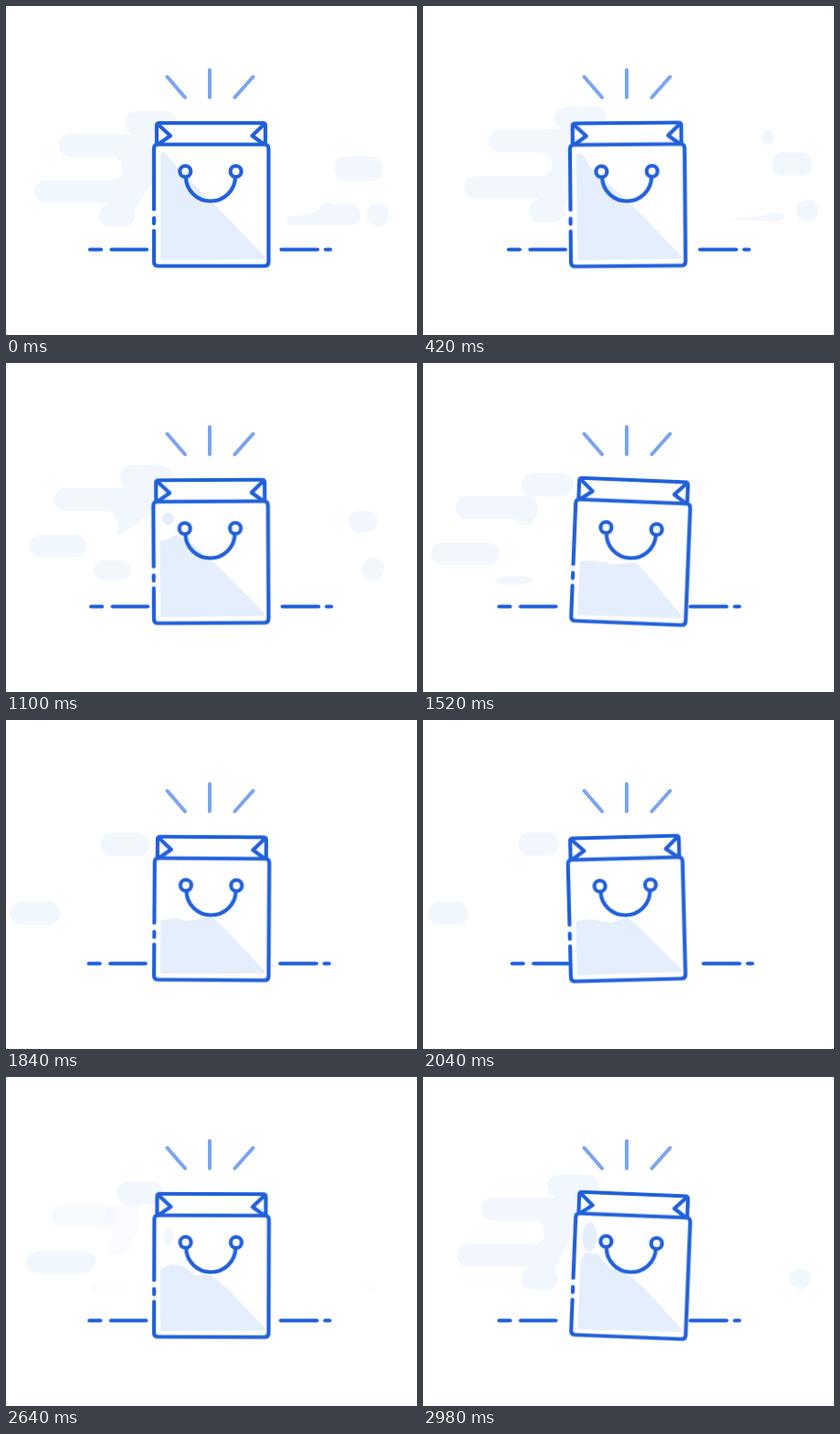
Animation of 450x360 px, one loop 3000 ms. Source, as an HTML page:

```html
<!DOCTYPE html>
<html lang="en">
<head>
<meta charset="utf-8">
<title>Happy shopping bag</title>
<style>
  html, body { margin: 0; height: 100%; overflow: hidden; background: #fff; }
  svg { display: block; width: 100%; height: 100%; }

  .line { fill: none; stroke: #2160da; stroke-width: 4.2; stroke-linecap: round; stroke-linejoin: round; }
  .paper { fill: #fff; }
  .spark { fill: none; stroke: #7aa4f0; stroke-width: 4; stroke-linecap: round; }
  .cloud { fill: #f2f7fe; }
  .shade { fill: #e5eefd; stroke: #e5eefd; stroke-width: 4; stroke-linejoin: round; }

  .cloud, .cloud *, .ground, .bag, .bag * { animation: 3s linear infinite; }

  /* Rocking bag, with the ground sliding the other way */
  .bag { transform-origin: 225px 284px; animation-name: rock; }
  .ground { animation-name: slide; }
  .bag, .ground { animation-timing-function: cubic-bezier(.37, 0, .63, 1); }
  @keyframes rock {
    0% { transform: rotate(0deg); }
    6.33% { transform: rotate(.5deg); }
    25.33%, 75% { transform: rotate(-2.3deg); }
    50.17%, 99.83%, 100% { transform: rotate(2.3deg); }
  }
  @keyframes slide {
    0% { transform: translateX(0); }
    6.33% { transform: translateX(-2px); }
    25.33%, 75% { transform: translateX(8.7px); }
    50.17%, 99.83%, 100% { transform: translateX(-8.7px); }
  }

  /* Cloud drift, one axis per group */
  .cloud { animation-name: drift-x; }
  .cloud .rise { animation-name: drift-y; }
  @keyframes drift-x {
    0% { transform: translateX(0); animation-timing-function: cubic-bezier(.3, .5, .6, 1); }
    14% { transform: translateX(14px); animation-timing-function: cubic-bezier(.37, 0, .63, 1); }
    61.33% { transform: translateX(-27px); animation-timing-function: cubic-bezier(.45, 0, .8, .75); }
    99.33%, 100% { transform: translateX(6px); }
  }
  @keyframes drift-y {
    0% { transform: translateY(0); animation-timing-function: cubic-bezier(.4, .5, .65, 1); }
    25.33% { transform: translateY(-6.5px); animation-timing-function: cubic-bezier(.37, 0, .63, 1); }
    61.33% { transform: translateY(8.5px); animation-timing-function: cubic-bezier(.45, 0, .8, .75); }
    99.33%, 100% { transform: translateY(-8px); }
  }

  /* Cloud parts thinning out and returning */
  .top { animation-name: top; }
  @keyframes top {
    0%, 50.67% { width: 57px; }
    61.33% { width: 55px; }
    76.67% { width: 33px; }
    92%, 100% { width: 57px; }
  }
  .mid { animation-name: mid; }
  @keyframes mid {
    0%, 36.67% { width: 100px; opacity: 1; }
    50.67% { width: 90px; opacity: 1; }
    60%, 82% { width: 60px; opacity: 0; }
    92%, 100% { width: 80px; opacity: 1; }
  }
  .low { animation-name: low; }
  @keyframes low {
    0%, 18% { width: 100px; }
    36.67% { width: 62px; }
    50.67% { width: 75px; }
    61.33% { width: 56px; }
    76.67% { width: 30px; }
    94%, 100% { width: 100px; }
  }
  .foot { animation-name: foot; }
  @keyframes foot {
    0%, 20% { y: 217px; height: 24px; opacity: 1; }
    36.67% { y: 219px; height: 21px; opacity: 1; }
    50.67% { y: 228px; height: 9px; opacity: 1; }
    57%, 84% { y: 230px; height: 6px; opacity: 0; }
    94%, 100% { y: 217px; height: 24px; opacity: 1; }
  }
  .core { animation-name: core; }
  @keyframes core {
    0%, 18% { opacity: 1; d: path("M120 140L162 140L162 190L140 224L112 222L112 191L115 191C131 191 131 165 115 165Z"); }
    36.67% { opacity: 1; d: path("M120 140L167 140L165 166L147 180L128 192L127 190L127 189C129 180 127 165 115 165Z"); }
    50.67% { opacity: 1; d: path("M120 142L146 142L148 160L140 171L130 172L127 170L127 169C127 167 122 165 115 165Z"); }
    60%, 82% { opacity: 0; d: path("M120 142L146 142L148 160L140 171L130 172L127 170L127 169C127 167 122 165 115 165Z"); }
    95%, 100% { opacity: 1; d: path("M120 140L162 140L160 172L138 222L112 222L112 191L115 191C131 191 131 165 115 165Z"); }
  }
  .pill { animation-name: pill; }
  @keyframes pill {
    0% { x: 360px; width: 52px; height: 26px; opacity: 1; }
    14% { x: 368px; width: 44px; height: 25px; opacity: 1; }
    36.67% { x: 380px; width: 32px; height: 23px; opacity: 1; }
    46%, 100% { x: 388px; width: 22px; height: 16px; opacity: 0; }
  }
  .tail { animation-name: tail; }
  @keyframes tail {
    0% { opacity: 1; d: path("M309 240Q304 236 309 230Q334 229 343 222Q346 214 353 215Q360 218 376 217Q388 217 388 228Q388 240 376 240Z"); }
    14% { opacity: 1; d: path("M318 239Q316 239 322 238Q345 236 360 234Q366 230 372 231Q376 230 379 232Q382 234 381 237Q380 240 372 240Z"); }
    24%, 100% { opacity: 0; d: path("M330 239Q332 239 334 238Q345 237 360 236Q366 234 372 234Q376 234 379 235Q380 236 380 237Q380 239 372 239Z"); }
  }
  .puff { animation-name: puff; }
  @keyframes puff {
    0%, 4% { opacity: 0; }
    10%, 18% { opacity: 1; }
    25%, 100% { opacity: 0; }
  }
  .dot { animation-name: dot; }
  @keyframes dot {
    0%, 38% { r: 12.2px; opacity: 1; }
    47%, 86% { r: 8px; opacity: 0; }
    96%, 100% { r: 11.5px; opacity: 1; }
  }

  /* Shadow inside the bag */
  .shade { animation-name: sink; }
  @keyframes sink {
    0% { d: path("M171 276L171 162L173 162L186 178L205 197L222 214L240 232L281 275Z"); }
    14% { d: path("M171 276L171 163L175 164L184 179L205 198L222 214L240 232L281 275Z"); }
    36.67% { d: path("M171 276L171 196L178 195L185 190L205 201L222 216L240 233L281 275Z"); }
    50.67% { d: path("M171 276L171 221L187 220L205 223L215 222L230 220L240 230L281 275Z"); }
    61.33% { d: path("M171 276L171 221L185 219L195 222L206 221L222 215L240 232L281 275Z"); }
    76.67% { d: path("M171 276L171 219L187 219L198 221L212 227L229 221L240 232L281 275Z"); }
    99.33%, 100% { d: path("M171 276L171 204L175 196L187 197L201 212L218 216L240 233L281 275Z"); }
  }
  .bag .drop { fill: #e5eefd; animation-name: drop; }
  @keyframes drop {
    0%, 14% { cy: 172px; rx: 7px; ry: 10px; opacity: 0; }
    20% { cy: 171px; rx: 7px; ry: 9px; opacity: 1; }
    36.67% { cy: 170px; rx: 6.5px; ry: 7px; opacity: 1; }
    45%, 82% { cy: 172px; rx: 3px; ry: 4px; opacity: 0; }
    94%, 100% { cy: 177px; rx: 8px; ry: 16px; opacity: 1; }
  }
</style>
</head>
<body>
<svg viewBox="0 0 450 360">
  <g class="cloud">
    <g class="rise">
      <rect class="top" x="130" y="115" width="57" height="25.5" rx="12.5"/>
      <rect class="mid" x="57.5" y="140" width="100" height="25" rx="12.5"/>
      <rect class="low" x="31" y="191" width="100" height="24.5" rx="12"/>
      <rect class="foot" x="101.5" y="217" width="40" height="24" rx="12"/>
      <path class="core"/>
      <rect class="pill" x="360" y="165" width="52" height="26" rx="11"/>
      <path class="tail"/>
      <ellipse class="puff" cx="363.5" cy="148.5" rx="6.5" ry="8.5"/>
      <circle class="dot" cx="407" cy="228.5" r="12.2"/>
    </g>
  </g>

  <path class="spark" d="M176.5 77.5L196 100M223 70V100M270.5 77.5L250.5 100"/>

  <path class="line ground" d="M92 266.5H104M115.5 266.5H154M301.5 266.5H341M350 266.5H355"/>

  <g class="bag">
    <rect class="paper" x="165" y="128" width="119" height="24"/>
    <rect class="paper" x="162" y="151.500" width="125.500" height="133" rx="4"/>
    <path class="shade"/>
    <ellipse class="drop" cx="178" cy="172" rx="7" ry="10"/>
    <path class="line" d="M165 151V131Q165 128 168 128H281Q284 128 284 131V151"/>
    <path class="line" d="M167 130L180 142L167 151M282 130L269.500 142L282 151"/>
    <path class="line" d="M162 222.500V156Q162 151.500 166 151.500H283Q287.500 151.500 287.500 156V280Q287.500 284.500 283 284.500H167Q162 284.500 162 280V246M162 232V238"/>
    <path class="line" d="M197 187A27 26.500 0 0 0 251 187"/>
    <circle class="line paper" cx="196.300" cy="181" r="6" style="fill:#fff"/>
    <circle class="line paper" cx="251.700" cy="181" r="6" style="fill:#fff"/>
  </g>
</svg>
</body>
</html>
```
